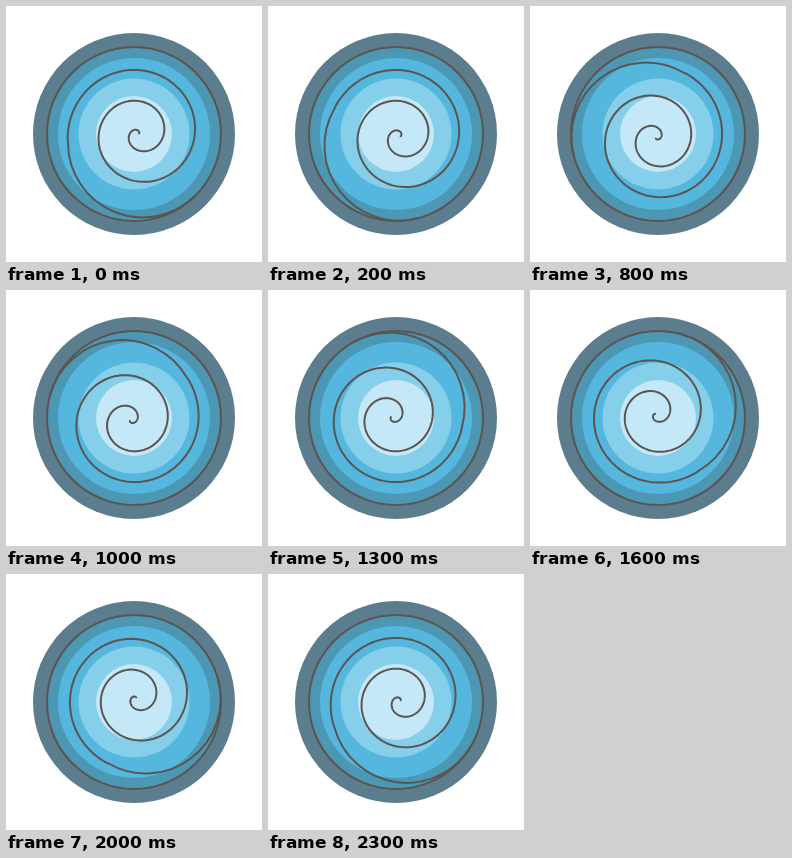
These frames come from a looping animation (256x256 px, 2.4 s). An HTML page:

```html
<!DOCTYPE html>
<html lang="en">
<head>
<meta charset="utf-8">
<title>Turning spiral</title>
<style>
  html, body { margin: 0; width: 100%; height: 100%; overflow: hidden; background: #fff; }
  svg { display: block; width: 100vw; height: 100vh; }
</style>
</head>
<body>
<svg viewBox="0 0 256 256">
  <g id="discs"></g>
  <g fill="none" stroke="#5a5550" stroke-width="2" stroke-linecap="round" stroke-linejoin="round">
    <circle cx="128" cy="128" r="87"/>
    <path id="spiral"/>
  </g>
</svg>
<script>
const LOOP = 2400, STEP = 100, CENTER = 128;
const discs = [[101, '#5b7d8d'], [87, '#4c97b4'], [76, '#55b6de'], [55.5, '#85cfeb'], [38, '#c5e8f8']];
const spiral = document.getElementById('spiral');

document.getElementById('discs').innerHTML = discs
  .map(([r, fill]) => `<circle cx="${CENTER}" cy="${CENTER}" r="${r}" fill="${fill}"/>`)
  .join('');

// Archimedean coil around an off-centre point, closed by an arc tangent to the rim.
function spiralPath() {
  const origin = { x: 133.1, y: 127.6 }, growth = 4.93, start = 288 * Math.PI / 180, turns = 14.53;
  const points = [];
  const count = 300;
  for (let i = 0; i <= count; i++) {
    const t = turns * i / count;
    const x = origin.x + growth * t * Math.cos(start - t);
    const y = origin.y + growth * t * Math.sin(start - t);
    points.push(`${x.toFixed(2)} ${y.toFixed(2)}`);
  }
  const radius = 74.7, shift = 8.7, rim = 87 * Math.SQRT1_2;
  const arcStart = `${CENTER + shift - radius} ${CENTER + shift}`;
  const arcEnd = `${CENTER + rim} ${CENTER + rim}`;
  return `M${points.join('L')}L${arcStart}A${radius} ${radius} 0 0 0 ${arcEnd}`;
}

function draw(time) {
  const step = Math.floor((time % LOOP) / STEP);
  spiral.setAttribute('transform', `rotate(${step * STEP / LOOP * 360} ${CENTER} ${CENTER})`);
}

spiral.setAttribute('d', spiralPath());
const begin = performance.now();
function tick() {
  draw(performance.now() - begin);
  requestAnimationFrame(tick);
}
tick();
</script>
</body>
</html>
```
